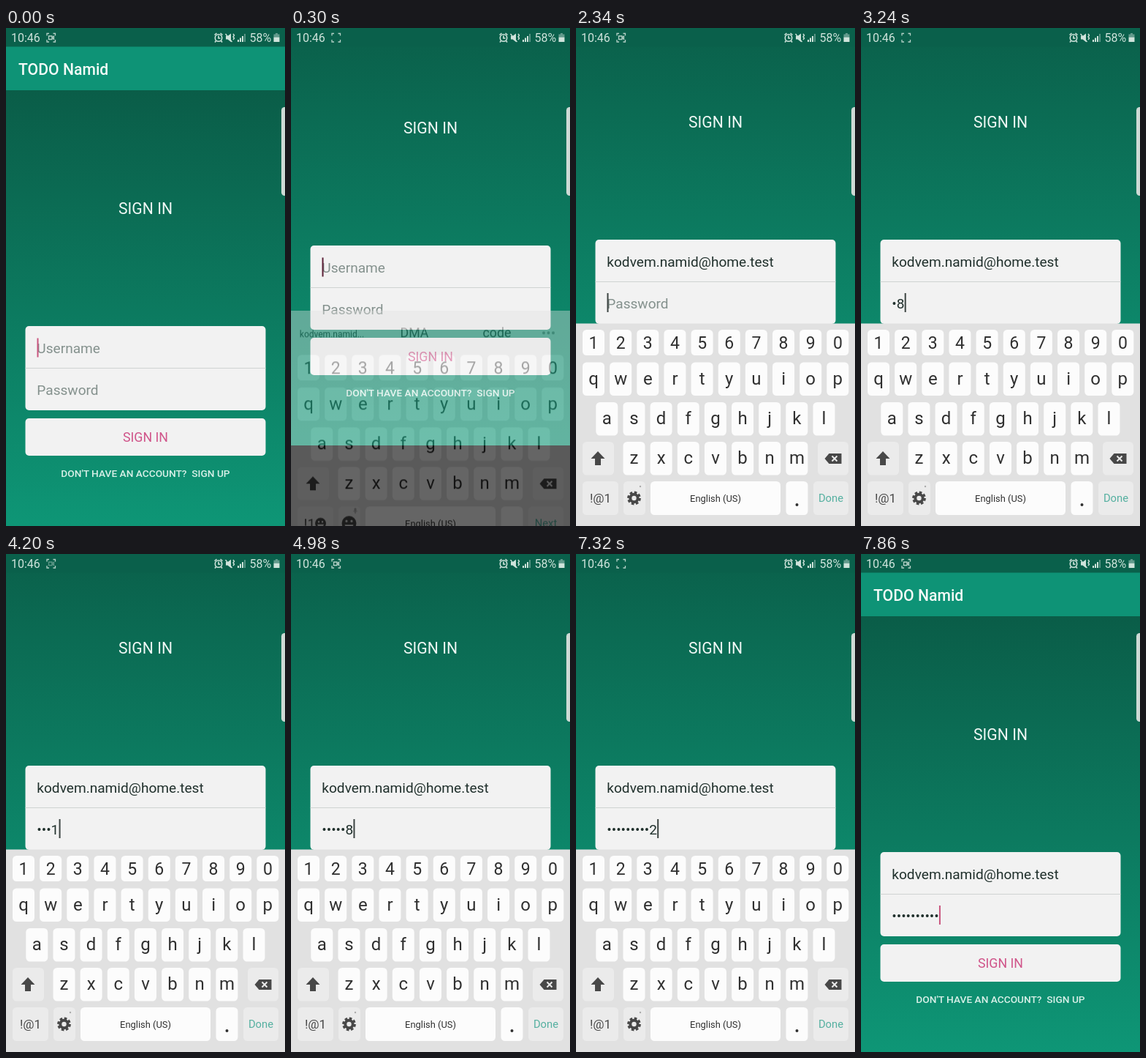
An HTML page for the animation above (8 s loop, 382 px wide and 680 px high).

```html
<!DOCTYPE html>
<html lang="en">
<head>
<meta charset="utf-8">
<title>Sign in</title>
<style>
html, body { margin: 0; width: 100%; height: 100%; overflow: hidden; background: #000; }
svg { display: block; width: 382px; height: 680px; font-family: Roboto, sans-serif; }
.mid { text-anchor: middle; }
.panel { fill: #f2f2f2; }
.field { font-size: 19.1px; fill: #20302c; }
.hint { fill: #84918d; }
.status { font-size: 16px; fill: #cfe3db; }
.key { fill: #fcfcfc; }
.key.fn { fill: #ebebeb; }
.label { fill: #303030; }
.glyph { fill: #484848; }
.teal { fill: #55b0a0; }

#app { animation: pan 8s infinite; }
#kb { animation: kb 8s linear infinite; }
#cam { animation: pulse 8s linear infinite; }
#caret { animation: caret 8s linear infinite; }
#plain { animation: plain 8s step-end infinite; }
#secret { animation: secret 8s step-end infinite; }

@keyframes pan {
  0%, .75% { transform: translateY(0); animation-timing-function: ease-out; }
  3.75% { transform: translateY(-110px); }
  6%, 21.75% { transform: translateY(-113px); }
  24.75%, 93.75% { transform: translateY(-118px); }
  97.5%, 100% { transform: translateY(0); }
}
@keyframes kb {
  0%, 1.5% { transform: translateY(90px); opacity: 0; }
  3.75% { transform: translateY(34.5px); opacity: .4; }
  6%, 93.75% { transform: translateY(0); opacity: 1; }
  96.5%, 100% { transform: translateY(90px); opacity: 0; }
}
@keyframes pulse {
  0%, .75% { opacity: 1; }
  2.25%, 13.5% { opacity: 0; }
  15.75%, 21% { opacity: 1; }
  23%, 27% { opacity: 0; }
  29.25%, 36% { opacity: 1; }
  38.25%, 45.75% { opacity: 0; }
  47.25%, 51.75% { opacity: 1; }
  53.25%, 58.5% { opacity: 0; }
  60.5%, 64.5% { opacity: 1; }
  66.5%, 70.5% { opacity: 0; }
  72.5%, 77% { opacity: 1; }
  78.7%, 84% { opacity: 0; }
  86.25%, 90% { opacity: 1; }
  91.5%, 93.75% { opacity: 0; }
  96%, 100% { opacity: 1; }
}
@keyframes caret {
  0%, .75% { fill: #c9557f; }
  3.75% { fill: #5c2036; }
  6%, 93.75% { fill: #3c4442; }
  97.5%, 100% { fill: #c9557f; }
}
@keyframes plain { 0% { visibility: visible; } 21.75%, 100% { visibility: hidden; } }
@keyframes secret { 0% { visibility: hidden; } 21.75%, 100% { visibility: visible; } }
</style>
</head>
<body>
<svg viewBox="0 0 382 680">
  <defs>
    <linearGradient id="green" gradientUnits="userSpaceOnUse" x1="0" y1="85" x2="0" y2="680">
      <stop offset="0" stop-color="#0a5d48"/>
      <stop offset="1" stop-color="#0e9676"/>
    </linearGradient>
  </defs>
  <rect width="382" height="680"/>

  <g id="app">
    <rect width="382" height="680" fill="url(#green)"/>
    <rect width="382" height="85" fill="#0e9376"/>
    <text x="17" y="63.5" font-size="21.2" font-weight="500" fill="#f4fbf8">TODO Namid</text>
    <text class="mid" x="191" y="254" font-size="21.2" fill="#f0f8f5">SIGN IN</text>
    <rect class="panel" x="26.5" y="407" width="329" height="115" rx="5"/>
    <rect x="26.5" y="464" width="329" height="1" fill="#cfd3d2"/>
    <text class="field" id="user" x="42.3" y="443.5"></text>
    <text class="field" id="pass" x="42.3" y="501"></text>
    <rect id="caret" width="2" height="26"/>
    <rect class="panel" x="26.5" y="533" width="329" height="51" rx="5"/>
    <text class="mid" x="191" y="565" font-size="17.8" fill="#d0558a">SIGN IN</text>
    <text class="mid" x="191" y="612.5" font-size="13.7" font-weight="500" fill="#d8f0e8">DON'T HAVE AN ACCOUNT?&#160; SIGN UP</text>
  </g>

  <g id="kb">
    <rect y="403.5" width="382" height="277" fill="#e1e1e1"/>
    <g id="keys"></g>
    <g id="plain">
      <rect y="352" width="382" height="52" fill="#e1e1e1"/>
      <g id="words"></g>
      <g fill="#8a8a8a">
        <circle cx="346" cy="382" r="2"/><circle cx="352.5" cy="382" r="2"/><circle cx="359" cy="382" r="2"/>
      </g>
      <text class="glyph" x="17.5" y="648.5" font-size="19">!1</text>
      <g class="glyph">
        <circle cx="40.5" cy="642" r="7.5"/><circle cx="79.5" cy="642" r="10"/>
        <rect x="86.5" y="621" width="3" height="5" rx="1.5" fill="#aaa"/>
        <path d="M85.5 625q2.5 4 5 0M88 627v2" fill="none" stroke="#aaa"/>
      </g>
      <g fill="#ebebeb">
        <circle cx="38" cy="640" r="1.2"/><circle cx="43" cy="640" r="1.2"/>
        <path d="M36 643.500h9q-1 4-4.500 4t-4.500-4z"/>
        <circle cx="76" cy="639" r="1.6"/><circle cx="83" cy="639" r="1.6"/>
        <path d="M73.500 644h12q-1.500 5-6 5t-6-5z"/>
      </g>
      <text class="mid teal" x="349" y="647" font-size="14.8">Next</text>
    </g>
    <g id="secret">
      <text class="mid glyph" x="33.500" y="648" font-size="17">!@1</text>
      <g fill="none" stroke="#484848">
        <circle cx="79.500" cy="642" r="5.200" stroke-width="4"/>
        <circle cx="79.500" cy="642" r="7.800" stroke-width="3.200" stroke-dasharray="3.600 2.526"/>
      </g>
      <circle cx="88" cy="626" r="1.200" fill="#aaa"/>
      <text class="mid teal" x="349" y="647" font-size="14.8">Done</text>
    </g>
  </g>

  <rect width="382" height="25.500" fill="#0a604b"/>
  <g class="status">
    <text x="7" y="19">10:46</text>
    <text x="333.500" y="19">58%</text>
    <g fill="none" stroke="#b4d0c6" stroke-width="1.300">
      <path d="M56 10.500v-3h3M64.500 7.500h3v3M67.500 16v3h-3M59 19h-3v-3"/>
      <path id="cam" d="M58.500 11h4.500v4.500h-4.500zM63 13l2.500-1.700v4z"/>
    </g>
    <g fill="none" stroke="#cfe3db" stroke-width="1.600">
      <circle cx="291" cy="13.500" r="4.700"/>
      <path d="M291 10.500v3.500h2.500M285.500 9.500l3-2.500M296.500 9.500l-3-2.500M287.500 17.500l-1.500 2M294.500 17.500l1.500 2"/>
      <path d="M300.500 8l9 11M311 8l1.500 2-1.500 2 1.500 2-1.500 2" stroke-width="1.400"/>
    </g>
    <path d="M301 11h2.500l4.500-3.500v11.500l-4.500-3.500h-2.500z"/>
    <path d="M317 16h2v3h-2zM320 13.500h2v5.500h-2zM323 11h2v8h-2z"/>
    <path d="M326 8h2v11h-2z" opacity=".4"/>
    <path d="M369 7h3v1.500h2.500v4h-8v-4h2.500z" opacity=".45"/>
    <path d="M366.500 12.500h8v6.500h-8z"/>
  </g>
  <rect x="377" y="108" width="10" height="121" rx="4.500" fill="#cddad5"/>
</svg>
<script>
const $ = id => document.getElementById(id);
const NS = 'http://www.w3.org/2000/svg';

function add(parent, tag, attrs, text = '') {
  const el = document.createElementNS(NS, tag);
  for (const name in attrs) el.setAttribute(name, attrs[name]);
  el.textContent = text;
  parent.append(el);
  return el;
}

const keys = $('keys');
const cap = (x, y, width, height, cls = '') =>
  add(keys, 'rect', { class: 'key ' + cls, x, y, width, height, rx: 5.5 });
const label = (x, y, size, text) =>
  add(keys, 'text', { class: 'mid label', x, y, 'font-size': size }, text);

// letters, first centre, top, height, baseline, font size
const rows = [
  ['1234567890', 24, 412, 35, 437.5, 23],
  ['qwertyuiop', 24, 456.5, 45.5, 486.5, 24],
  ['asdfghjkl', 42.3, 511, 45.5, 541, 24],
  ['zxcvbnm', 79.5, 565, 45.5, 595, 24]
];
for (const [chars, x0, top, height, base, size] of rows)
  [...chars].forEach((ch, i) => {
    const x = x0 + i * 37.15;
    cap(x - 15, top, 30, height);
    label(x, base, size, ch);
  });

cap(9, 565, 43, 45.5, 'fn');
cap(331, 565, 42, 45.5, 'fn');
cap(9, 619, 49, 46, 'fn');
cap(65, 619, 30, 46, 'fn');
cap(102, 619, 178, 46);
cap(287.5, 619, 30, 46);
cap(325, 619, 48, 46, 'fn');
label(191, 646.5, 12.9, 'English (US)');
add(keys, 'circle', { class: 'label', cx: 302.5, cy: 651, r: 2 });
add(keys, 'path', { class: 'glyph', d: 'M30 578l9.500 10h-5.500v9h-8v-9h-5.500z' });
add(keys, 'path', { class: 'glyph', d: 'M340.500 588l6-7h17v14h-17z' });
add(keys, 'path', { d: 'M350.500 584.500l7 7m0-7l-7 7', stroke: '#ebebeb', 'stroke-width': 2 });

const words = [56, 169, 282].map(x =>
  add($('words'), 'text', { class: 'mid label', x, y: 388 }));

const LOOP = 8000, PICK = 1140, NEXT = 1740, CLOSE = 7500;
const email = 'kodvem.namid@home.test';
const digits = '4801583692';
const presses = [2400, 2940, 3660, 4140, 4700, 4900, 5160, 5340, 5640, 5880];

function fill(el, value, hint) {
  const text = value || hint;
  if (el.textContent !== text) el.textContent = text;
  el.classList.toggle('hint', !value);
  return value ? el.getComputedTextLength() : 0;
}

function password(t) {
  const n = presses.filter(p => t >= p).length;
  if (!n) return '';
  return '•'.repeat(n - 1) + (t < CLOSE ? digits[n - 1] : '•');
}

function draw(t) {
  const picked = t >= PICK, onPass = t >= NEXT;
  const name = picked ? email + (onPass ? '' : '\u00a0') : '';
  const userLen = fill($('user'), name, 'Username');
  const passLen = fill($('pass'), password(t), 'Password');
  $('caret').setAttribute('x', 42.5 + (onPass ? passLen : userLen));
  $('caret').setAttribute('y', onPass ? 480 : 423.5);

  const list = picked ? ['is', 'to', 'the'] : ['kodvem.namid...', 'DMA', 'code'];
  words.forEach((el, i) => {
    el.textContent = list[i];
    el.setAttribute('font-size', list[i].length > 8 ? 12 : 17.8);
  });
}

let start;
function tick(now) {
  start ??= now;
  draw((now - start) % LOOP);
  requestAnimationFrame(tick);
}
draw(0);
requestAnimationFrame(tick);
</script>
</body>
</html>
```
